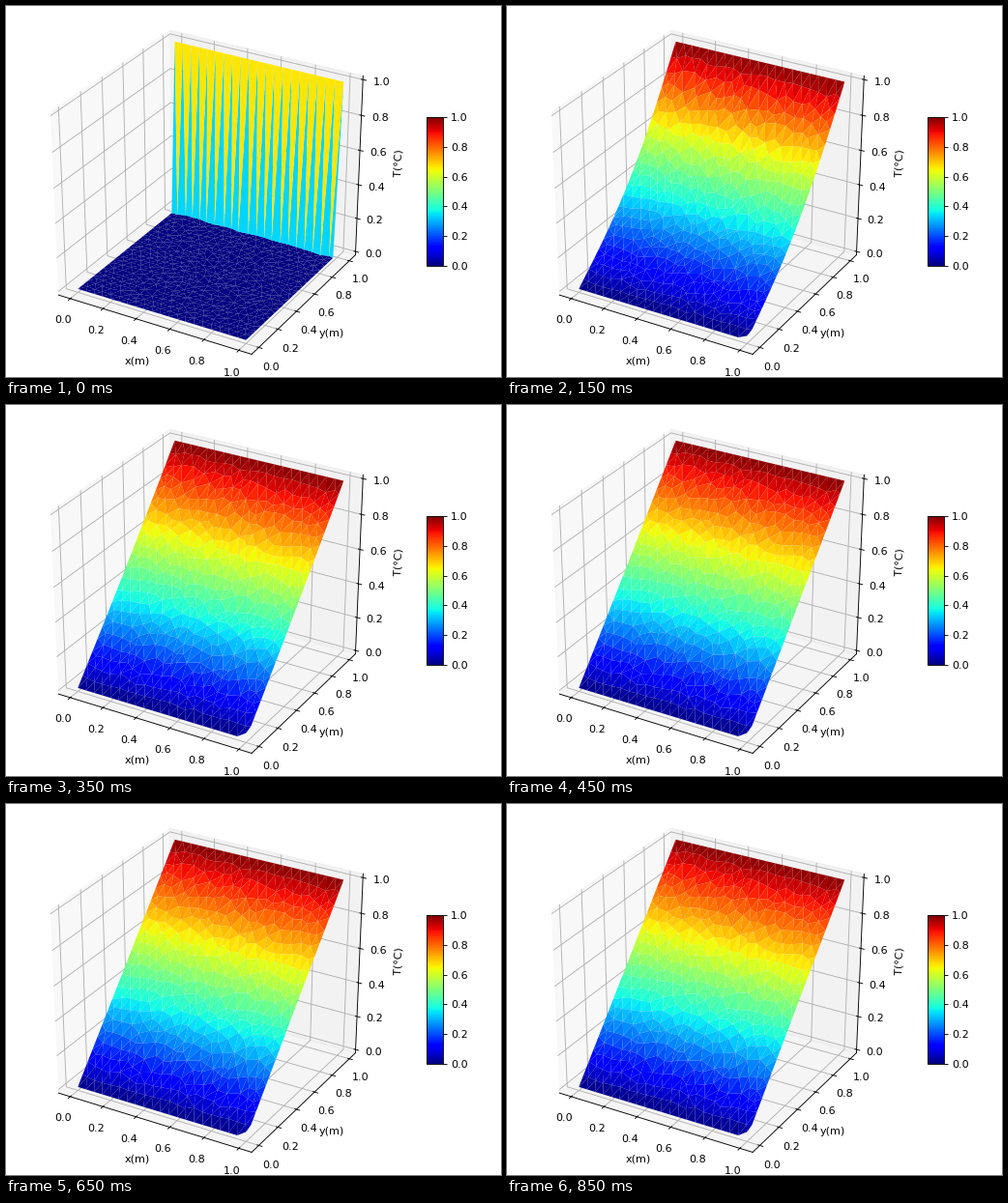
These frames come from a looping animation (512x384 px, 900 ms). A matplotlib script:

```python
import numpy as np
import matplotlib.pyplot as plt
from matplotlib.animation import FuncAnimation
from matplotlib.cm import ScalarMappable
from matplotlib.colors import Normalize
from matplotlib.tri import Triangulation
from mpl_toolkits.mplot3d import Axes3D

FRAMES = 18
INTERVAL = 50
SIDE = 20      # mesh edges along each side of the plate
STEP = 0.08    # time step of the heat equation
TICKS = np.linspace(0, 1, 6)

plt.rcParams["font.family"] = "DejaVu Sans"


class StretchedAxes(Axes3D):
    """3D axes that fill their rectangle instead of staying square."""

    def apply_aspect(self, position=None):
        pass


def neighbour_mean(points):
    edges = Triangulation(points[:, 0], points[:, 1]).edges
    both = np.vstack([edges, edges[:, ::-1]])
    total = np.zeros_like(points)
    np.add.at(total, both[:, 0], points[both[:, 1]])
    count = np.bincount(both[:, 0], minlength=len(points))
    return total / count[:, None]


def make_mesh():
    """Irregular triangles on the unit square with even boundary edges."""
    rng = np.random.default_rng(4)
    side = np.linspace(0, 1, SIDE + 1)
    zero, one = np.zeros(SIDE + 1), np.ones(SIDE + 1)
    border = np.vstack([
        np.column_stack([side, zero]),
        np.column_stack([side, one]),
        np.column_stack([zero, side])[1:-1],
        np.column_stack([one, side])[1:-1],
    ])
    inner = []
    for row, y in enumerate(np.linspace(0.043, 0.957, 21)):
        if row % 2 == 0:
            xs = (np.arange(SIDE) + 0.5) / SIDE
        else:
            xs = np.arange(1, SIDE) / SIDE
        inner += [(x, y) for x in xs]
    inner = np.array(inner)
    # scatter more away from the border, then even out the triangles
    gap = np.minimum(inner, 1 - inner).min(axis=1)
    reach = np.clip(0.25 * gap, 0.005, 0.024)
    inner += rng.uniform(-1, 1, inner.shape) * reach[:, None]
    points = np.vstack([border, inner])
    for _ in range(2):
        mean = neighbour_mean(points)
        points[len(border):] += 0.4 * (mean - points)[len(border):]
    return Triangulation(points[:, 0], points[:, 1])


def profile(y, step):
    """Heat spreading from the hot edge, by implicit time steps."""
    if step == 0:
        return np.where(y == 1, 1.0, 0.0)
    temp = y.copy()
    for n in range(1, 200):
        decay = (1 + STEP * (n * np.pi) ** 2) ** -step
        temp += 2 / np.pi * (-1) ** n / n * decay * np.sin(n * np.pi * y)
    return np.clip(temp, 0, 1)


def temperature(step):
    temp = profile(mesh.y, step)
    # the near corner is free and follows its neighbours
    corner = (mesh.x == 1) & (mesh.y == 0)
    temp[corner] = 0.72 * profile(np.array([1 / SIDE]), step)
    return temp


def update(step):
    corners = mesh.triangles
    temp = temperature(step)
    verts = np.stack([mesh.x[corners], mesh.y[corners], temp[corners]], axis=-1)
    surface.set_verts(verts)
    surface.set_array(temp[corners].mean(axis=1))
    return [surface]


mesh = make_mesh()
fig = plt.figure(figsize=(6.4, 4.8), dpi=80, facecolor="white")
ax = StretchedAxes(fig, [0, 0, 0.8, 1])
fig.add_axes(ax)

surface = ax.plot_trisurf(mesh, temperature(0), cmap="jet", vmin=0, vmax=1,
                          linewidth=0, antialiased=True)

pad = 0.05 + 1.1 / 48
ax.set_xlim(-pad, 1 + pad)
ax.set_ylim(-pad, 1 + pad)
ax.set_zlim(-1 / 48, 1 + 1 / 48)
ax.set_box_aspect((1, 1, 1), zoom=np.sqrt(3) / 1.82946407)  # unit cube
ax.view_init(elev=30, azim=-60)
for axis, name in ((ax.xaxis, "x(m)"), (ax.yaxis, "y(m)"), (ax.zaxis, "T(°C)")):
    axis.set_ticks(TICKS)
    axis.set_label_text(name)

bar_ax = fig.add_axes([0.85, 0.3, 1 / 30, 0.4])
fig.colorbar(ScalarMappable(Normalize(0, 1), "jet"), cax=bar_ax, ticks=TICKS)

anim = FuncAnimation(fig, update, frames=FRAMES, interval=INTERVAL,
                     repeat=True, repeat_delay=0, blit=False)
plt.show()
```
